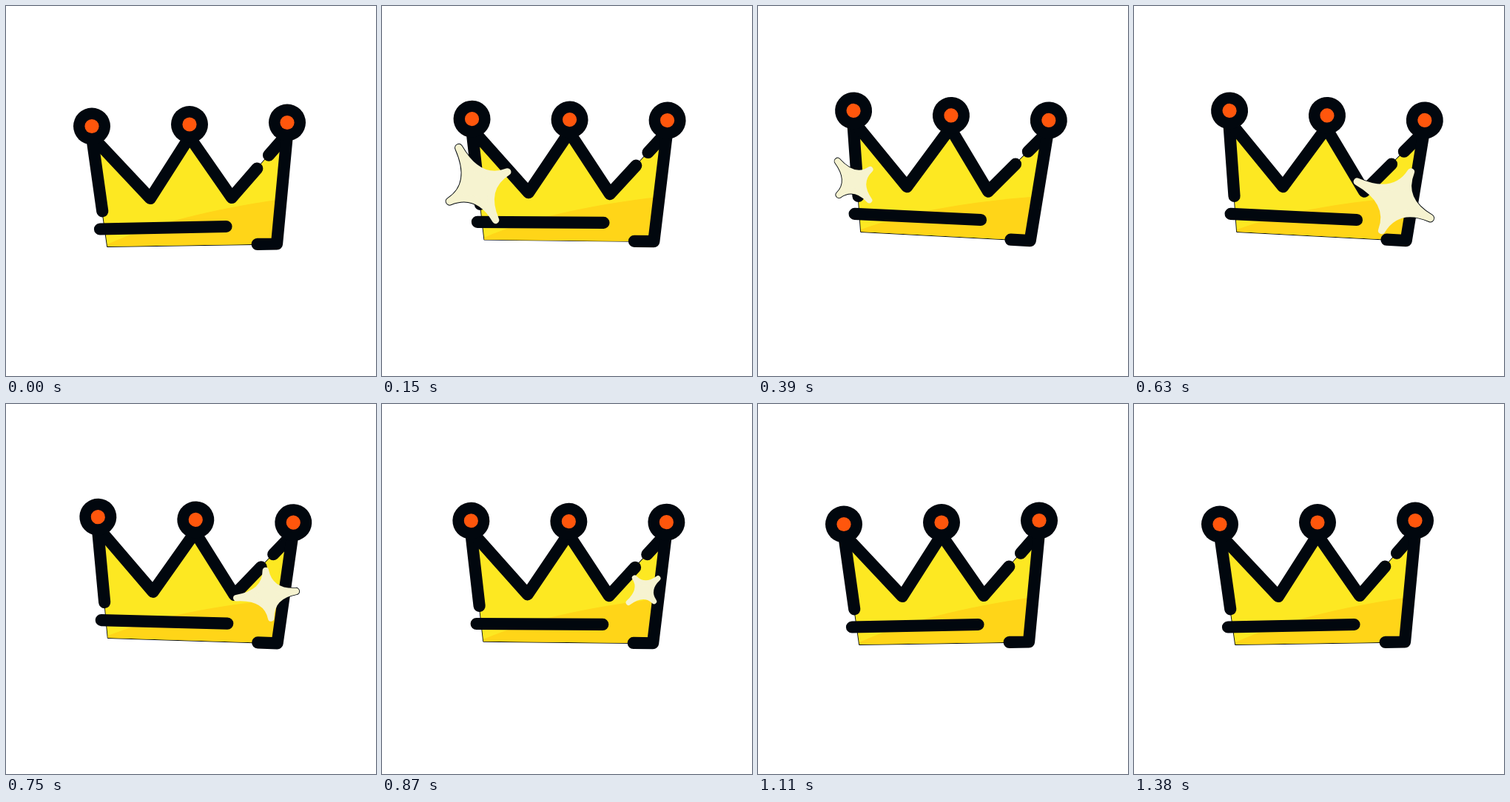
An HTML page with a canvas that plays this animation: 500 by 500 pixels, repeating every 3380 ms.

```html
<!DOCTYPE html>
<html lang="en">
<head>
<meta charset="utf-8">
<title>Sparkling crown</title>
<style>
  html, body { margin: 0; width: 100%; height: 100%; overflow: hidden; background: #fff; }
  canvas { display: block; width: 100vw; height: 100vh; object-fit: contain; }
</style>
</head>
<body>
<canvas id="stage" width="500" height="500"></canvas>
<script>
const ctx = document.getElementById('stage').getContext('2d');
const LOOP = 3380, STEP = 30, RAD = Math.PI / 180;
const INK = '#01070e', YELLOW = '#fde822', SHADE = '#ffd518', ORANGE = '#ff560c', CREAM = '#f6f3d0';
const TILT_TIME = 390, RETURN_AT = 630;

const clamp = v => Math.min(1, Math.max(0, v));
const mix = (a, b, f) => a.map((v, i) => v + (b[i] - v) * f);
// Cubic ease-out; s > 0 makes it overshoot.
const backOut = (u, s = 0) => 1 + (s + 1) * (u - 1) ** 3 + s * (u - 1) ** 2;

function line(points, closed) {
  const path = new Path2D();
  points.forEach(([x, y]) => path.lineTo(x, y));
  if (closed) path.closePath();
  return path;
}

function stroke(path, color, width) {
  ctx.strokeStyle = color;
  ctx.lineWidth = width;
  ctx.stroke(path);
}

function disc(x, y, r, color) {
  ctx.fillStyle = color;
  ctx.beginPath();
  ctx.arc(x, y, r, 0, Math.PI * 2);
  ctx.fill();
}

// Crown corners: three peaks, two valleys, two base corners.
const left = [116, 176], mid = [248, 177], right = [380, 173];
const dipL = [195, 260], dipR = [305, 259];
const baseL = [137, 325], baseR = [366, 321.5];

const body = line([left, dipL, mid, dipR, right, baseR, baseL], true);
const shade = new Path2D('M137 322Q225 282 372 261L366 321.5L137 325Z');
const bars = [
  [left, mix(left, baseL, 0.68)],
  [left, dipL, mid, dipR, mix(dipR, right, 0.457)],
  [mix(dipR, right, 0.667), right],
  [right, baseR, mix(baseR, baseL, 0.115)],
  [[127, 301.5], [297.5, 298]]
].map(p => line(p));

function drawCrown(t) {
  const up = clamp(t / TILT_TIME), down = clamp((t - RETURN_AT) / TILT_TIME);
  const hop = backOut(up) - backOut(down, 5);
  const shift = backOut(up) - backOut(down);
  ctx.save();
  ctx.translate(baseR[0] + 1.7 * shift, baseR[1] - 4.4 * hop);
  ctx.rotate(3.9 * (up - down) * RAD);
  ctx.translate(-baseR[0], -baseR[1]);
  stroke(body, INK, 1.8);
  ctx.fillStyle = YELLOW;
  ctx.fill(body);
  ctx.fillStyle = SHADE;
  ctx.fill(shade);
  bars.forEach(p => stroke(p, INK, 16.2));
  for (let i = 0; i < 3; i++) {
    const x = 116 + 132 * i, y = 162.5 - 2.5 * i;
    disc(x, y, 25, INK);
    disc(x, y, 9.6, ORANGE);
  }
  ctx.restore();
}

// Speeds are per second; a higher fade shrinks the star sooner.
const sparkles = [
  { start: 30, x: 130.5, y: 247, rise: 25, angle: -111, spin: -50, fade: 0.5 },
  { start: 570, x: 354.5, y: 267, rise: 54, angle: -137, spin: -275, fade: 1 }
];
const LIFE = 510, GROW = 60;

// Four-pointed star, longer along its first axis.
function starPath(size, angle) {
  const tips = [0, 1, 2, 3].map(i => {
    const r = size * (i % 2 ? 44 : 55 + 4 * Math.cos(i * Math.PI / 2));
    const a = (angle + 90 * i) * RAD;
    return [r * Math.cos(a), r * Math.sin(a)];
  });
  const path = new Path2D();
  path.moveTo(...tips[0]);
  tips.forEach(([x, y], i) => {
    const [nx, ny] = tips[(i + 1) % 4];
    path.quadraticCurveTo((x + nx) * 0.07, (y + ny) * 0.07, nx, ny);
  });
  path.closePath();
  return path;
}

function drawSparkle(s, t) {
  const age = t - s.start, sec = age / 1000;
  if (age <= 0 || age >= LIFE) return;
  const size = 1.14 * clamp(age / GROW) * (1 - age / LIFE) ** s.fade;
  const path = starPath(size, s.angle + s.spin * sec);
  const width = 9.6 * size ** 0.4;
  ctx.save();
  ctx.translate(s.x, s.y - s.rise * sec);
  ctx.fillStyle = CREAM;
  ctx.fill(path);
  stroke(path, CREAM, width);
  // The dark rim shows only outside the crown.
  ctx.globalCompositeOperation = 'destination-over';
  stroke(path, INK, width + 1.8);
  ctx.restore();
}

function frame(now) {
  const t = Math.floor((now % LOOP) / STEP) * STEP;
  ctx.clearRect(0, 0, 500, 500);
  ctx.lineCap = ctx.lineJoin = 'round';
  drawCrown(t);
  sparkles.forEach(s => drawSparkle(s, t));
}

let start;
function tick(now) {
  if (start === undefined) start = now;
  frame(Math.max(0, now - start));
  requestAnimationFrame(tick);
}
frame(0);
requestAnimationFrame(tick);
</script>
</body>
</html>
```
